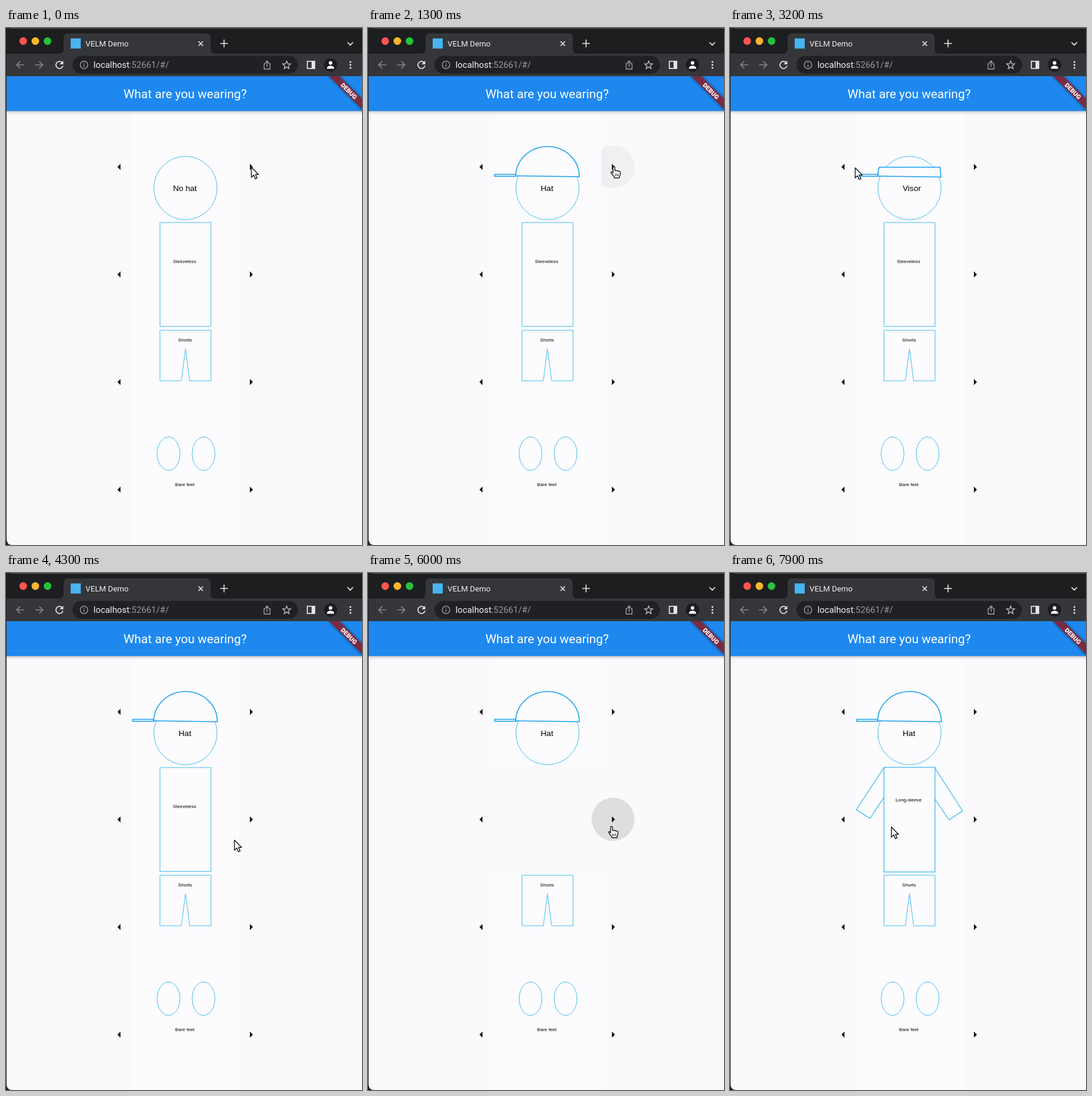
An HTML page that plays this animation: 600x869 px, repeating every 8 s.

```html
<!DOCTYPE html>
<html lang="en">
<head>
<meta charset="utf-8">
<title>Outfit picker</title>
<style>
html, body { margin: 0; width: 100%; height: 100%; overflow: hidden; background: #1d1e20; }
svg { display: block; width: 600px; height: 869px; }
.ui { font-family: Roboto, sans-serif; }
.label { font-family: "Liberation Sans", Arial, sans-serif; fill: #000; stroke: none; }
.icon { fill: none; stroke: #e4e5e8; stroke-width: 1.7; }
.dim { stroke: #86878b; }
.line { fill: none; stroke: #43bcec; stroke-width: 1; }
.bold { fill: #fcfbfe; stroke: #18a2ee; stroke-width: 1.6; }
.sleeve { stroke: #25aeee; stroke-width: 1.1; }
.pointer { fill: #fff; stroke: #17181b; stroke-width: 1.4; stroke-linejoin: round; }
</style>
</head>
<body>
<svg viewBox="0 0 600 869">
  <defs>
    <linearGradient id="shade" x2="0" y2="1">
      <stop stop-color="#000" stop-opacity=".27"/>
      <stop offset=".4" stop-color="#000" stop-opacity=".09"/>
      <stop offset="1" stop-color="#000" stop-opacity="0"/>
    </linearGradient>
    <filter id="glow" x="-20%" y="-60%" width="140%" height="220%"><feGaussianBlur stdDeviation="2.4"/></filter>
    <clipPath id="page"><path d="M1 81H600V869H11Q1 869 1 859Z"/></clipPath>
  </defs>

  <!-- browser frame -->
  <rect width="600" height="869" fill="#1d1e20"/>
  <path d="M8 .5H600" stroke="#55565a"/>
  <path d="M1 43H89Q97 43 97 35V17Q97 9 105 9H337Q345 9 345 17V35Q345 43 353 43H600V81H1Z" fill="#35363a"/>
  <circle cx="29" cy="22" r="6.4" fill="#fe5550"/>
  <circle cx="49.5" cy="22" r="6.4" fill="#fdb62c"/>
  <circle cx="70" cy="22" r="6.4" fill="#26c23c"/>
  <rect x="109" y="17.5" width="17" height="17" fill="#48b4ee"/>
  <g class="ui">
    <text x="134" y="30.5" font-size="13.2" fill="#f0f1f3">VELM Demo</text>
    <rect x="112" y="47" width="380" height="30" rx="15" fill="#202124"/>
    <text x="147.5" y="67.2" font-size="14.8" fill="#f0f1f3">localhost<tspan fill="#999a9e">:52661/#/</tspan></text>
  </g>
  <g class="icon">
    <path d="M324.500 22.500l7.500 7.500m0-7.500l-7.500 7.500M361 26h13m-6.500-6.500v13M575.500 24l4.700 4.700 4.700-4.700"/>
    <path class="dim" d="M31 62H18m6-6l-6 6 6 6M49 62h13m-6-6l6 6-6 6"/>
    <path d="M94.700 58.200A6 6 0 1 0 96 63.500"/>
    <path d="M96.500 55v6h-6z" fill="#e4e5e8" stroke="none"/>
    <g stroke="#a5a6aa" stroke-width="1.3">
      <circle cx="131.500" cy="62" r="6.300"/>
      <path d="M131.500 61v4.500m0-7.500v1.500"/>
      <path d="M437.500 60h-2.500v9h10v-9h-2.500M440 65.500v-10m-3 3l3-3 3 3"/>
      <path id="star" stroke="#c3c4c8"/>
    </g>
    <rect x="507.800" y="56" width="12.500" height="12"/>
    <path d="M515 56h5.300v12H515z" fill="#e4e5e8" stroke="none"/>
    <circle cx="547" cy="62" r="11.200" fill="#1b1c1f" stroke="none"/>
    <path d="M547 55.500a3.100 3.100 0 1 1-.01 0ZM540.800 68.500q0-5 6.200-5t6.200 5z" fill="#fff" stroke="none"/>
    <g fill="#e4e5e8" stroke="none">
      <circle cx="580.500" cy="57" r="1.600"/><circle cx="580.500" cy="62" r="1.600"/><circle cx="580.500" cy="67" r="1.600"/>
    </g>
  </g>

  <!-- app -->
  <g clip-path="url(#page)">
    <rect x="1" y="81" width="599" height="788" fill="#faf9fb"/>
    <circle id="ripple" r="36.200"/>
    <g id="rows"></g>
    <rect x="1" y="139" width="599" height="7" fill="url(#shade)"/>
    <rect x="1" y="81" width="599" height="58.500" fill="#1e88ee"/>
    <text class="ui" x="198" y="118.300" font-size="20.700" fill="#fff">What are you wearing?</text>
    <g transform="translate(603 81) rotate(45)">
      <rect x="-42" y="29" width="84" height="12.400" fill="#000" opacity=".5" filter="url(#glow)"/>
      <rect x="-42" y="29" width="84" height="12.400" fill="#7a2b42"/>
      <text class="ui" y="39" font-size="10.500" font-weight="900" fill="#fff" text-anchor="middle">DEBUG</text>
    </g>
  </g>

  <g id="arrow" class="pointer">
    <path d="M0 0V17L4 13.300L6.700 19.600L9.600 18.400L6.900 12.200H12Z"/>
  </g>
  <g id="hand" class="pointer" stroke-width="1.200">
    <path d="M-1.600 11V1.700Q-1.500 0 0 0T1.600 1.700V7Q3 5.600 4.400 7.200Q6 6.200 7.300 7.800Q10.600 7 10.700 10V13Q10.500 15 9.200 16.500V19H.6V17Q-2 14.500-4.600 10.800Q-5.500 8.800-3.800 8.600Q-2.600 9-1.600 11Z"/>
    <path d="M2.200 12v4m2.500-4v4m2.500-4v4" stroke-width="1"/>
  </g>
</svg>

<script>
const LOOP = 8000, STEP = 100;
const $ = id => document.getElementById(id);
const label = (text, x, y, size = 8.1) =>
  `<text class="label" x="${x}" y="${y}" font-size="${size}">${text}</text>`;
const path = (d, kind = 'line') => `<path class="${kind}" d="${d}"/>`;

const head = '<circle class="line" cx="302.5" cy="269" r="53.3"/>';
const brim = path('M213.500 246H249V249.300H213.500Z', 'bold');
const body = (top, bottom, kind) => path(`M259.500 ${top}H345.500V${bottom}H259.500Z`, kind);

const art = {
  noHat: head + label('No hat', 281.5, 274, 13.6),
  hat: head + brim + path('M249 248.500A53.500 50 0 0 1 356 250Z', 'bold') + label('Hat', 291, 274, 13.6),
  visor: head + brim + path('M251.500 234H354L355.500 250.500L249.500 249Q249 241 251.500 234Z', 'bold') +
    label('Visor', 291, 274, 13.6),
  sleeveless: body(327, 501.5) + label('Sleeveless', 281.3, 394.5),
  shortSleeve: body(326.5, 502.5, 'line sleeve') +
    path('M259.500 327L236 362.500L259.500 377M345.500 328L369 364L345.500 380', 'line sleeve') +
    label('Short-sleeve', 278.5, 383.5),
  longSleeve: body(326.5, 502.5, 'line sleeve') +
    path('M259.500 327L212.800 398L236 412.500L259.500 377M345.500 328L392 400L369 415L345.500 380', 'line sleeve') +
    label('Long-sleeve', 279, 383.5),
  shorts: path('M259.500 508H345.500V593H309.500L302.500 539L295.500 593H259.500Z') + label('Shorts', 290, 526.5),
  bareFeet: '<ellipse class="line" cx="274" cy="715.5" rx="19.2" ry="28.1"/>' +
    '<ellipse class="line" cx="333" cy="715.5" rx="19.2" ry="28.1"/>' + label('Bare feet', 285, 769.5)
};

// Each row: [time, picture]; null while the picture loads.
const rows = [
  [[0, 'noHat'], [600, null], [700, 'hat'], [2100, null], [2200, 'visor'], [3900, 'hat']],
  [[0, 'sleeveless'], [5900, null], [6100, 'shortSleeve'], [7100, null], [7200, 'longSleeve']],
  [[0, 'shorts']],
  [[0, 'bareFeet']]
];

const track = [
  [0, 413.5, 234], [100, 414.5, 233], [2800, 414.5, 233], [2900, 390, 235], [3200, 211, 235],
  [3300, 194, 234], [3400, 191, 234], [3900, 191, 234], [4000, 215, 255], [4300, 385, 449],
  [4600, 392, 444], [4700, 396, 440], [4900, 409, 428], [5000, 410.5, 426], [7600, 410.5, 426],
  [7700, 390, 427], [7800, 320, 427], [7900, 272, 427]
];
// [enter, leave, x, y]
const hovers = [[100, 2900, 413, 233.5], [3300, 4000, 190, 233.5], [4900, 7700, 413, 414]];
// [down, fade start, fade end]
const presses = [[500, 900, 1300], [2000, 2200, 2500], [3800, 3900, 4100], [5800, 6000, 6300], [7000, 7200, 7500]];

const clamp = v => Math.max(0, Math.min(1, v));
const latest = (steps, t) => steps.filter(s => s[0] <= t).pop();

function pointerAt(t) {
  const a = latest(track, t), b = track[track.indexOf(a) + 1] || a;
  const k = b === a ? 0 : (t - a[0]) / (b[0] - a[0]);
  return [a[1] + (b[1] - a[1]) * k, a[2] + (b[2] - a[2]) * k];
}

function pressAt(t) {
  return Math.max(...presses.map(([down, fade, end]) =>
    Math.min(clamp((t - down + STEP) / 200), clamp((end - t) / (end - fade)))));
}

$('star').setAttribute('d', 'M' + Array.from({ length: 10 }, (_, i) => {
  const r = i % 2 ? 3.1 : 7, a = i * Math.PI / 5;
  return `${(473 + r * Math.sin(a)).toFixed(1)} ${(62.5 - r * Math.cos(a)).toFixed(1)}`;
}).join('L') + 'Z');

$('rows').innerHTML = rows.map((_, i) => {
  const y = 233.5 + i * 180.8;
  return `<g id="row${i}"></g><path d="M193 ${y - 5.2}v10.400l-5.200-5.200zM411 ${y - 5.2}v10.400l5.200-5.200z" fill="#16171a"/>`;
}).join('');

const shown = [];
function showRow(i, name) {
  if (shown[i] === name) return;
  shown[i] = name;
  $('row' + i).innerHTML = name
    ? `<rect x="212.5" y="${143 + i * 181}" width="180.5" height="181" fill="#fcfbfe"/>` + art[name]
    : '';
}

function draw(t) {
  rows.forEach((steps, i) => showRow(i, latest(steps, t)[1]));

  const hover = hovers.find(h => t >= h[0] && t < h[1]);
  const ripple = $('ripple');
  ripple.style.opacity = hover ? 0.04 + 0.075 * pressAt(t) : 0;
  if (hover) {
    ripple.setAttribute('cx', hover[2]);
    ripple.setAttribute('cy', hover[3]);
  }

  const [x, y] = pointerAt(t);
  for (const id of ['arrow', 'hand']) {
    $(id).setAttribute('transform', `translate(${x} ${y})`);
    $(id).style.display = (id === 'hand') === !!hover ? '' : 'none';
  }
}

const start = performance.now();
function tick() {
  const t = (performance.now() - start) % LOOP;
  draw(Math.floor(t / STEP) * STEP);
  requestAnimationFrame(tick);
}
tick();
</script>
</body>
</html>
```
